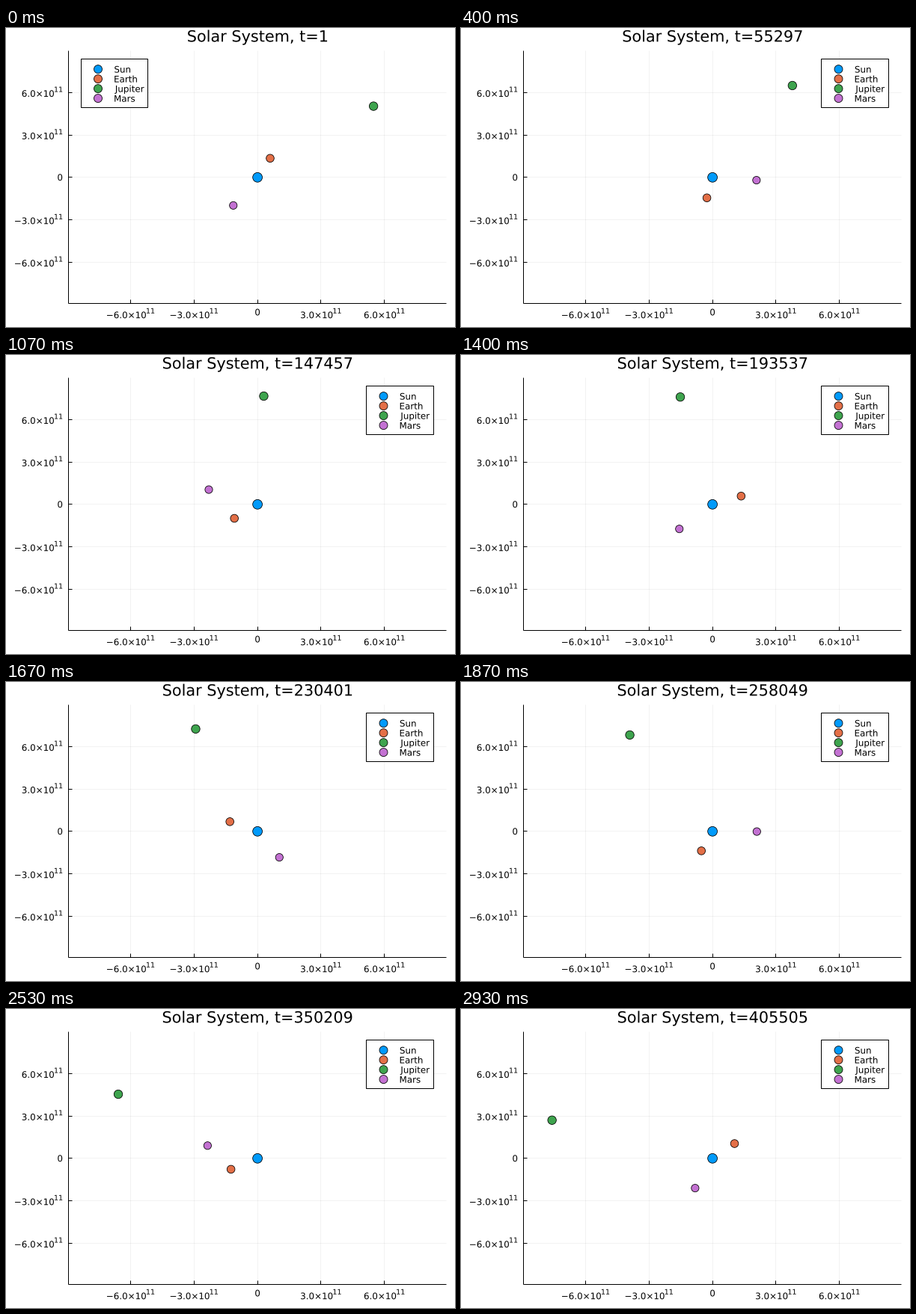
A matplotlib script that plays this animation: 600 px wide and 400 px high, repeating every 2990 ms.

```python
import numpy as np
import matplotlib.pyplot as plt
from matplotlib.animation import FuncAnimation
from matplotlib.patches import Circle, PathPatch, Rectangle
from matplotlib.path import Path
from matplotlib.textpath import TextPath
from matplotlib.transforms import Affine2D

plt.rcParams["font.family"] = "DejaVu Sans"

W, H, DPI = 600, 400, 100
FRAMES, LOOP_MS = 45, 2990
STEPS_PER_FRAME = 9216
PX = 72 / DPI  # one pixel in points

LEFT, RIGHT, TOP, BOTTOM = 83.5, 588.5, 30.5, 368.5
CX, CY = 336.1, 199.8              # origin of the plot in pixels
SX, SY = 84.75 / 3, 56.75 / 3      # pixels per 1e11 m
TITLE, SMALL = 20.8, 11.89         # font sizes in pixels
LEGEND_SHIFT = 381.5

# name, colour, radius, (p, e, perihelion, mean anomaly, mean motion)
BODIES = [
    ("Sun", "#009afa", 6.4, (0, 0, 0, 0, 0)),
    ("Earth", "#e36f47", 5.3, (1.475, 0, 0, 66.1, 32.25)),
    ("Jupiter", "#3ea44e", 5.7, (7.735, 0.046, 10, 29.78, 2.681)),
    ("Mars", "#c371d2", 5.1, (2.281, 0.0983, 333, -81.7, 16.556)),
]

fig = plt.figure(figsize=(W / DPI, H / DPI), dpi=DPI, facecolor="white")
ax = fig.add_axes([0, 0, 1, 1])
ax.set_xlim(0, W)
ax.set_ylim(H, 0)
ax.axis("off")


def text_path(parts, x, y, align):
    """Join (string, size, rise) parts; align their ink horizontally at x."""
    verts, codes, pen = [], [], 0
    for string, size, rise in parts:
        glyphs = TextPath((0, 0), string, size=size)
        verts.append(glyphs.vertices * [1, -1] + [pen, y - rise])
        codes.append(glyphs.codes)
        pen += glyphs.get_extents().x1
    path = Path(np.concatenate(verts), np.concatenate(codes))
    box = path.get_extents()
    path.vertices[:, 0] += x - box.x0 - align * box.width
    return path


def add_text(parts, x, y, align, z=2, transform=None):
    patch = PathPatch(text_path(parts, x, y, align), fc="black", lw=0,
                      snap=False, zorder=z)
    if transform is not None:
        patch.set_transform(transform)
    return ax.add_patch(patch)


def add_line(x, y, **style):
    """Draw a line in the pixel row or column that holds it."""
    ax.plot(np.floor(x), np.floor(y), solid_capstyle="butt", **style)


def add_dot(x, y, r, color, z, **kw):
    return ax.add_patch(Circle((x, y), r, fc=color, ec="black", lw=0.8 * PX,
                               zorder=z, **kw))


def tick_parts(value):
    if value == 0:
        return [("0", SMALL, 0)]
    sign = "\u2212" if value < 0 else ""
    return [(f"{sign}{abs(value):.1f}\u00d710", SMALL, 0),
            ("11", 0.8 * SMALL, 6.5)]


# Grid, ticks and axes
grid = dict(color="black", alpha=0.05, lw=PX, zorder=0)
axis = dict(color="black", lw=PX, zorder=1)
for value in (-6, -3, 0, 3, 6):
    x, y = CX + value * SX, CY - value * SY
    add_line([x, x], [TOP, BOTTOM], **grid)
    add_line([LEFT, RIGHT], [y, y], **grid)
    add_line([x, x], [BOTTOM, BOTTOM - 5], **axis)
    add_line([LEFT, LEFT + 5], [y, y], **axis)
    parts = tick_parts(value)
    add_text(parts, x, 388.2 if value else 384.4, 0.5)
    add_text(parts, 75.2, y + (5.7 if value else 4.3), 1)
add_line([LEFT, LEFT], [TOP, BOTTOM], **axis)
add_line([LEFT, RIGHT], [BOTTOM, BOTTOM], **axis)

# Legend, movable as one group
shift = Affine2D()
moved = shift + ax.transData
ax.add_patch(Rectangle((99.8, 41), 89.6, 65, fc="white", ec="black",
                       lw=PX, zorder=5, transform=moved))
for i, (name, color, _, _) in enumerate(BODIES):
    y = 55.1 + 13 * i
    add_dot(123, y, 5.5, color, 6, transform=moved)
    add_text([(name, SMALL, 0)], 145.2, y + 4.5, 0, 6, moved)

title = add_text([("Solar System, t=1", TITLE, 0)], CX, 18.3, 0.5)
dots = [add_dot(CX, CY, r, color, 3 + 0.1 * i)
        for i, (_, color, r, _) in enumerate(BODIES)]


def position(orbit, k):
    """Pixel position on a Kepler orbit after k steps."""
    p, e, peri, m0, n = orbit
    m = np.radians(m0 + n * k)
    ecc = m
    for _ in range(20):
        ecc = m + e * np.sin(ecc)
    nu = 2 * np.arctan2(np.sqrt(1 + e) * np.sin(ecc / 2),
                        np.sqrt(1 - e) * np.cos(ecc / 2))
    r, a = p / (1 + e * np.cos(nu)), nu + np.radians(peri)
    return CX + SX * r * np.cos(a), CY - SY * r * np.sin(a)


def in_corner(x, y):
    return (x > LEFT + 0.75 * (RIGHT - LEFT)
            and y < TOP + 0.25 * (BOTTOM - TOP))


def update(k):
    spots = [position(body[3], k) for body in BODIES]
    for dot, spot in zip(dots, spots):
        dot.center = spot
    # The legend avoids the top right corner while a body is there
    crowded = any(in_corner(x, y) for x, y in spots)
    shift.clear().translate(0 if crowded else LEGEND_SHIFT, 0)
    label = f"Solar System, t={1 + STEPS_PER_FRAME * k}"
    title.set_path(text_path([(label, TITLE, 0)], CX, 18.3, 0.5))
    return [*dots, title]


anim = FuncAnimation(fig, update, frames=FRAMES, interval=LOOP_MS / FRAMES,
                     repeat=True, repeat_delay=0, blit=False)
plt.show()
```
